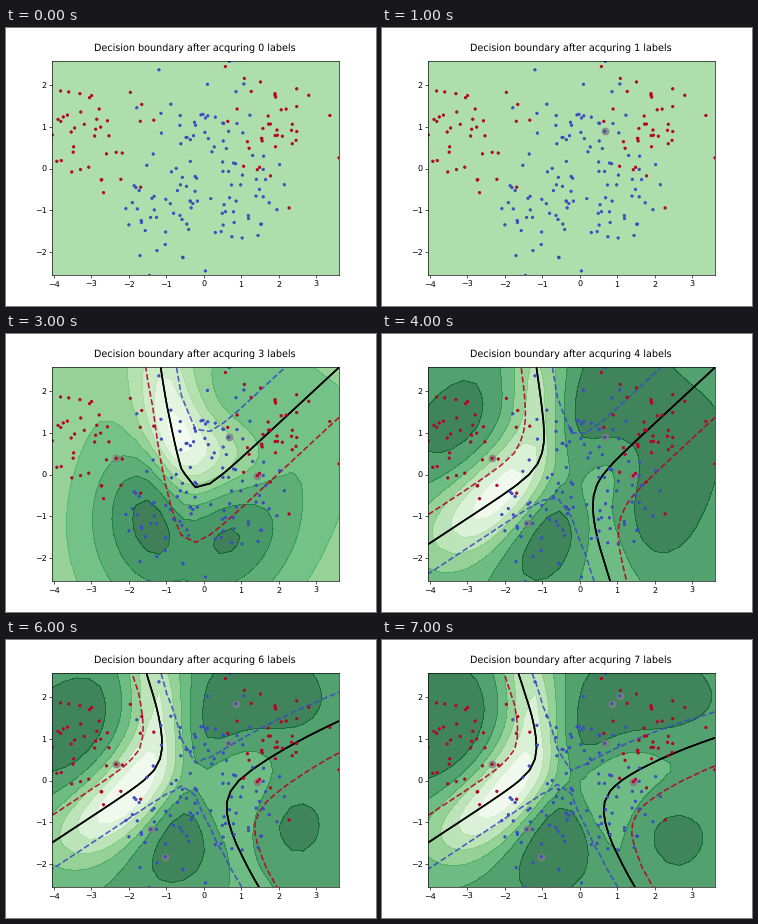
Write a matplotlib script that moves like this. It is 370 px wide and 278 px high and loops after 8000 ms.

```python
import numpy as np
import matplotlib.pyplot as plt
from matplotlib.animation import FuncAnimation

DPI = 57.8125
W, H = 370, 278
GAMMA = 0.5
EPS = np.finfo(float).eps
plt.rcParams["text.hinting"] = "no_hinting"

# Five Gaussian blobs, alternating between the two classes
rng = np.random.RandomState(0)
CENTERS = [(0, 1), (-3, 0.5), (-1, -1), (2, 1), (1, -0.5)]
PER_BLOB = 40
X = np.vstack([rng.normal(c, 0.7, (PER_BLOB, 2)) for c in CENTERS])
y = np.repeat(np.arange(len(CENTERS)), PER_BLOB) % 2
lo, hi = X.min(axis=0), X.max(axis=0)

# Samples in the order in which they get labelled
PICKS = [(0.67, 0.9), (-2.33, 0.38), (1.42, -0.03), (-1.4, -1.16),
         (0.83, 1.84), (-0.99, -1.8), (1.07, 2.03)]
order = [int(np.argmin(((X - p) ** 2).sum(axis=1))) for p in PICKS]


def kernel(a, b):
    return np.exp(-GAMMA * ((a[:, None] - b[None]) ** 2).sum(axis=-1))


def mesh(res):
    gx, gy = np.meshgrid(*(np.linspace(lo[i], hi[i], res) for i in (0, 1)))
    return gx, gy, np.c_[gx.ravel(), gy.ravel()]


def class_mass(points, idx):
    """Kernel mass of each class at the given points."""
    return kernel(points, X[idx]) @ np.eye(2)[y[idx]]


def entropy(p):
    return -p * np.log(p + EPS) - (1 - p) * np.log(1 - p + EPS)


def utility(points, idx):
    """Negative expected log loss after labelling each candidate point."""
    rest = np.delete(X, idx, axis=0)
    mass = class_mass(rest, idx)
    gain = kernel(rest, points)
    prob = class_mass(points, idx)
    prob /= prob.sum(axis=1, keepdims=True)
    total = 0
    for c in (0, 1):
        own = mass[:, [c]] + gain
        loss = entropy(own / (own + mass[:, [1 - c]]))
        total = total - prob[:, c] * loss.sum(axis=0)
    return total


fig, ax = plt.subplots(figsize=((W + 1e-6) / DPI, (H + 1e-6) / DPI), dpi=DPI)
COOLWARM = plt.get_cmap("coolwarm", 2)


def draw_utility(idx):
    if len(idx) < 2:
        ax.axvspan(lo[0], hi[0], color="#addeab", lw=0, zorder=0)
        return
    gx, gy, points = mesh(25)
    ax.contourf(gx, gy, utility(points, idx).reshape(gx.shape),
                cmap="Greens", alpha=0.75)


def draw_boundary(idx):
    if len(idx) < 2:
        return
    gx, gy, points = mesh(21)
    mass = class_mass(points, idx)
    prob = mass / mass.sum(axis=1, keepdims=True)
    for c in (0, 1):
        p = prob[:, c].reshape(gx.shape)
        ax.contour(gx, gy, p, [0.5], colors="k", linewidths=2, zorder=1)
        ax.contour(gx, gy, p, [0.75], colors=[COOLWARM(c)], linewidths=2,
                   linestyles="--", alpha=0.9, zorder=1)


def draw(count):
    ax.clear()
    idx = order[:count]
    draw_utility(idx)
    ax.scatter(*X[idx].T, c="grey", alpha=0.8, marker=".", s=300, zorder=1)
    ax.scatter(*X.T, c=y, cmap="coolwarm", marker=".", zorder=2)
    draw_boundary(idx)
    ax.text(0.498, 1.05, f"Decision boundary after acquring {count} labels",
            ha="center", size=12, transform=ax.transAxes)
    ax.set_xlim(lo[0], hi[0])
    ax.set_ylim(lo[1], hi[1])


anim = FuncAnimation(fig, draw, frames=8, interval=1000,
                     init_func=lambda: None, repeat=True)
plt.show()
```
